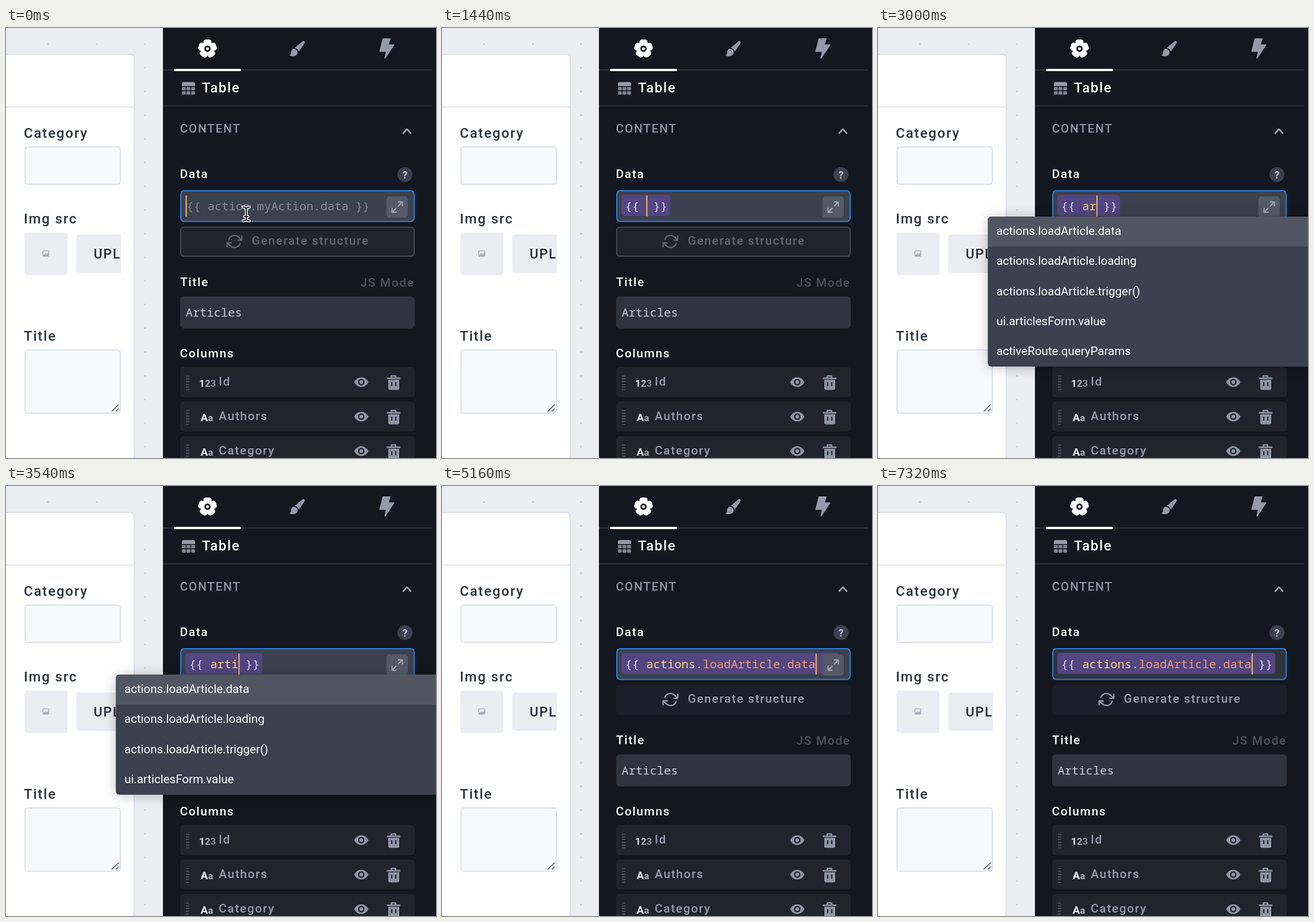
Recreate the animation shown at these times as an HTML page. Size 748 by 748 pixels, loop 7.35 s.

```html
<!DOCTYPE html>
<html lang="en">
<head>
<meta charset="utf-8">
<title>Table data binding</title>
<style>
  html, body { margin: 0; width: 100%; height: 100%; overflow: hidden; background: #ecedf2; }
  #stage { position: absolute; left: 0; top: 0; width: 748px; height: 748px; overflow: hidden; }
  svg { position: absolute; left: 0; top: 0; display: block; }
  text { white-space: pre; }
  .ui { font: 500 21px Roboto, "Open Sans", sans-serif; letter-spacing: .076em; }
  .big { font-size: 24px; }
  .mono { font: 400 20.45px "Roboto Mono", "Noto Sans Mono", "DejaVu Sans Mono", monospace; }
  .field { fill: #f8f9fd; stroke: #dde0ec; stroke-width: 2; }
  .line { fill: none; stroke-linecap: round; stroke-linejoin: round; }
  #menu {
    position: absolute; left: 191px; top: 328px; width: 570px; overflow: hidden;
    border-radius: 6px; background: #3c404f; color: #fff;
    box-shadow: 0 2px 22px rgba(0, 0, 0, .24);
    font: 400 20.5px/50px Roboto, "Open Sans", sans-serif;
  }
  #menu div { height: 52.3px; padding-left: 15px; white-space: nowrap; }
  #menu div:first-child { background: #525663; }
  #bar { position: absolute; left: 742px; top: 328px; width: 6px; height: 420px; background: #14171f; }
  #bar::before { content: ""; display: block; height: 146px; background: #3c404f; border-radius: 0 0 3px 3px; }
</style>
</head>
<body>
<div id="stage">
<svg width="748" height="748" viewBox="0 0 748 748">
  <g id="dots" fill="#c3c6d1"></g>

  <path d="M-10 46H217Q223 46 223 52V760H-10Z" fill="#fff" stroke="#dcdfea" stroke-width="2"/>
  <path d="M0 137.5H222" stroke="#e6e8ef" stroke-width="2"/>
  <g class="ui big" fill="#2b2f3b">
    <text x="31" y="191">Category</text>
    <text x="31" y="340">Img src</text>
    <text x="31" y="544">Title</text>
  </g>
  <rect class="field" x="33" y="207" width="166" height="65" rx="5"/>
  <rect class="field" x="33" y="560" width="166" height="110" rx="5"/>
  <path d="M184 667L196 655M191 667L196 662" stroke="#50545f" stroke-width="1.7"/>
  <rect x="32" y="356" width="75" height="74" rx="5" fill="#ecedf2"/>
  <rect x="64" y="387.500" width="10.500" height="9.500" rx="2" fill="none" stroke="#a9adba" stroke-width="1.500"/>
  <path d="M64.500 395L68 392L70 393.500L74 391V397H65Z" fill="#a9adba"/>
  <path d="M200 359H127Q122 359 122 364V421Q122 426 127 426H200Z" fill="#ecedf2"/>
  <text class="ui" x="152.500" y="401" fill="#262b38" style="font-size:23px">UPL</text>
  <rect x="200" y="359" width="22" height="67" fill="#fff"/>

  <rect x="273" width="475" height="748" fill="#14171f"/>
  <path d="M273 73H741M273 135.500H741" stroke="#30343e" stroke-width="2"/>
  <rect x="292" y="71" width="117" height="4" rx="1.500" fill="#fff"/>

  <g id="gear" fill="#fff"></g>
  <g fill="#959aaa">
    <path d="M516 23Q520 21 519.500 26L509.500 41Q508 36 502.500 34.500Z"/>
    <path d="M500.500 36Q507 37 507.500 43Q506 49 499 49Q494 49 493 47Q496.500 46 496 41.500Q496.500 36.500 500.500 36Z"/>
    <path d="M656 19H668L664.500 29.500H674.500L659.500 52L662 40.500H650.500Z" stroke="#959aaa" stroke-width="2" stroke-linejoin="round"/>
  </g>
  <g id="grid" fill="#7d8291">
    <path d="M306 101V97Q306 94 309 94H326Q329 94 329 97V101Z" fill="#959aa8"/>
  </g>
  <g class="ui">
    <text class="big" x="341" y="112" fill="#fff">Table</text>
    <text x="302.500" y="181.500" fill="#8f94a3">CONTENT</text>
    <g fill="#fff">
      <text x="302.500" y="261">Data</text>
      <text x="303" y="449">Title</text>
      <text x="302.500" y="573">Columns</text>
    </g>
    <text x="616.500" y="450" fill="#4d515c">JS Mode</text>
  </g>
  <path class="line" d="M691 183L697.500 176L704 183" stroke="#9a9fae" stroke-width="2.800"/>
  <circle cx="694" cy="255" r="13" fill="#3e4150"/>
  <text x="694" y="261.500" text-anchor="middle" fill="#c3c8d6" style="font:700 18px Roboto,sans-serif">?</text>

  <rect id="input" x="304" y="283" width="406" height="53.500" rx="6" stroke="#2f80d6" stroke-width="2"/>
  <text id="hint" class="mono" x="314" y="317" fill="#858a97">{{ action.myAction.data }}</text>
  <rect id="pill" x="312" y="290" height="37" rx="5" fill="#534681"/>
  <text class="mono" x="318.500" y="317" fill="#dcdde8"><tspan id="open"></tspan><tspan id="head" fill="#f9d283"></tspan><tspan id="tail" fill="#f09b73"></tspan><tspan id="close"></tspan></text>
  <rect id="caret" y="291.500" width="2" height="36.500" fill="#f4bd62"/>
  <g id="expand">
    <rect x="662" y="293" width="37" height="37" rx="5" fill="#555a68"/>
    <path class="line" d="M682.500 302.500H689.500V309.500M689 303L682.500 309.500M678.500 320.500H671.500V313.500M672 320L678.500 313.500" stroke="#a7acba" stroke-width="1.900"/>
  </g>

  <rect id="button" x="304" y="346.500" width="406" height="50.500" rx="5" stroke-width="2"/>
  <g id="label">
    <path class="line" transform="translate(383.500 357.500) scale(1.160)" stroke-width="2" d="M23 4v6h-6M1 20v-6h6M3.510 9a9 9 0 0 1 14.850-3.360L23 10M1 14l4.640 4.360A9 9 0 0 0 20.490 15"/>
    <text class="ui" x="427.500" y="377" stroke="none">Generate structure</text>
  </g>

  <rect x="303" y="467" width="408" height="55.500" rx="6" fill="#30343f"/>
  <text class="mono" x="312.500" y="502" fill="#c8cbd2">Articles</text>
  <g id="rows"></g>

  <circle id="ring" fill="#fff" fill-opacity=".03" stroke="#d8dae0" stroke-width="3"/>
  <g id="mouse">
    <g id="beam" class="line"></g>
    <path id="arrow" d="M0 0V23L5.500 18L9.500 27L13.500 25L9.500 16.500H17Z" fill="#000" stroke="#fff" stroke-width="1.800" stroke-linejoin="round"/>
  </g>
</svg>
<div id="menu"></div>
<div id="bar"></div>
</div>

<script>
const LOOP = 7350, STEP = 30, CHAR = 12.27;
const $ = id => document.getElementById(id);
const add = (id, markup) => $(id).insertAdjacentHTML("beforeend", markup);
const show = (id, on) => { $(id).style.display = on ? "" : "none"; };
const set = (id, attrs) => { for (const k in attrs) $(id).setAttribute(k, attrs[k]); };

// Static repeats
const dot = (x, y) => add("dots", `<circle cx="${x}" cy="${y}" r="1.6"/>`);
dot(73, 28);
dot(158, 28);
for (let i = 0; i < 18; i++) dot(242, 28 + i * 41.2);

for (let i = 0; i < 5; i++) {
  add("gear", `<rect x="343.5" y="20" width="14" height="16" rx="4.500" transform="rotate(${i * 72} 350.5 36)"/>`);
}
add("gear", `<circle cx="350.5" cy="36" r="11.500"/><circle cx="350.5" cy="36" r="4" fill="none" stroke="#14171f" stroke-width="3"/>`);

for (let i = 0; i < 6; i++) {
  add("grid", `<rect x="${306 + i % 3 * 8}" y="${i < 3 ? 102.5 : 110}" width="6.800" height="6" rx="1"/>`);
}

const tag = (a, b, c = "") => `<tspan fill="#eceef3">${a}</tspan><tspan fill="#a9adb8" font-size="17">${b}</tspan><tspan fill="#858a97" font-size="17">${c}</tspan>`;
const row = (name, kind, y) => {
  let grip = "";
  for (let i = 0; i < 6; i++) grip += `M313 ${15.5 + i * 4.8}h6`;
  add("rows", `<g transform="translate(0 ${y})">
    <rect x="303" width="408" height="52" rx="5" fill="#21242d"/>
    <path d="${grip}" stroke="#535763" stroke-width="1.700"/>
    <text x="${kind === "n" ? 336 : 338.5}" y="34" style="font:700 ${kind === "n" ? 17 : 19}px Roboto,sans-serif">${kind === "n" ? tag(1, 2, 3) : tag("A", "a")}</text>
    <text class="ui" x="370" y="32" fill="#969bab">${name}</text>
    <g fill="#9095a5">
      <path d="M605.500 26Q610 17.500 618 17.500T630.500 26Q626 34.500 618 34.500T605.500 26Z"/>
      <circle cx="618" cy="26" r="4.500" stroke="#21242d" stroke-width="2.500"/>
      <path d="M669 18V15.500Q669 14 670.500 14H677.500Q679 14 679 15.500V18H686V20.800H662.500V18ZM671.500 18H676.500V16.500H671.500Z" fill-rule="evenodd"/>
      <path d="M665 22H684V36.500Q684 39.500 681 39.500H668Q665 39.500 665 36.500Z"/>
      <path d="M671 26V33M678 26V33" stroke="#21242d" stroke-width="2.200"/>
    </g></g>`);
};
row("Id", "n", 590);
row("Authors", "t", 650);
row("Category", "t", 710);

const beam = "M-5.500 -12Q-1 -12 0 -9Q1 -12 5.500 -12M0 -9V9M-5.500 12Q-1 12 0 9Q1 12 5.500 12M-3 4.500H3";
add("beam", `<path d="${beam}" stroke="#fff" stroke-width="4.800"/><path d="${beam}" stroke="#15171d" stroke-width="1.900"/>`);

// Timeline: [time, value]
const typed = [[0, null], [1440, ""], [2640, "a"], [2880, "ar"], [3150, "art"], [3420, "arti"], [3690, "artic"], [4800, "actions.loadArticle.data"]];
const caretOn = [[0, true], [2040, false], [2640, true], [4200, false], [5160, true]];
const article = ["data", "loading", "trigger()"].map(s => "actions.loadArticle." + s);
const users = ["data", "loading", "trigger()"].map(s => "actions.loadTestUsers." + s);
const form = "ui.articlesForm.value";
const lists = [
  [0, []],
  [1500, [...article, ...users, form, "ui.table.deletedRow.data", "ui.table.selectedRow.data"]],
  [2880, [...article, form, "activeRoute.queryParams"]],
  [3420, [...article, form]],
  [4800, []]
];
const at = (table, t) => table.reduce((v, [time, next]) => t >= time ? next : v, table[0][1]);

const clamp = v => Math.max(0, Math.min(1, v));
const ease = p => p * p * (3 - 2 * p);
const path = [[0, 418, 323.5], [420, 418, 323.5], [780, 390.5, 320.5], [5940, 390.5, 320.5], [6210, 388, 319.5], [6360, 388, 319.5], [7080, 352, -32], [LOOP, 352, -32]];
const mouseAt = t => {
  const i = path.findIndex(p => p[0] > t);
  const [t0, x0, y0] = path[i - 1], [t1, x1, y1] = path[i];
  const p = ease((t - t0) / (t1 - t0));
  return [x0 + (x1 - x0) * p, y0 + (y1 - y0) * p];
};

let shownList;
const drawMenu = list => {
  if (list === shownList) return;
  shownList = list;
  $("menu").innerHTML = list.map(s => `<div>${s}</div>`).join("");
  show("menu", list.length);
  show("bar", list.length > 5);
};

function draw(t) {
  const code = at(typed, t), active = code !== null, ready = t >= 4800;
  const [x, y] = mouseAt(t), hover = y > 282;

  set("input", { fill: hover ? "#3c4150" : "#30343f" });
  show("hint", !active);
  show("pill", active);
  show("expand", hover);
  const dotAt = active ? code.indexOf(".") + 1 : 0;
  $("open").textContent = active ? "{{ " : "";
  $("head").textContent = active ? (dotAt ? code.slice(0, dotAt) : code) : "";
  $("tail").textContent = dotAt ? code.slice(dotAt) : "";
  $("close").textContent = active ? " }}" : "";
  set("pill", { width: active ? (code.length + 6) * CHAR + 11 : 0 });
  set("caret", { x: active ? 318.5 + (code.length + 3) * CHAR : 312.5 });
  show("caret", at(caretOn, t));

  set("button", { fill: ready ? "#1c1f29" : "#21242d", stroke: ready ? "#1c1f29" : "#444853" });
  const ink = ready ? "#969bab" : "#636772";
  set("label", { fill: ink, stroke: ink });
  drawMenu(at(lists, t));

  const p = clamp((t - 780) / 360);
  show("ring", p > 0 && p < 1);
  set("ring", { cx: 390.5, cy: 320, r: 72 * (1 - (1 - p) ** 2), opacity: .7 * clamp((1 - p) * 2) });

  set("mouse", {
    transform: `translate(${x} ${y})`,
    opacity: t < 5940 ? clamp((1260 - t) / 120) : clamp((t - 5910) / 90)
  });
  show("beam", hover);
  show("arrow", !hover);
}

const start = performance.now();
function tick() {
  const t = (performance.now() - start) % LOOP;
  draw(Math.floor(t / STEP) * STEP);
  requestAnimationFrame(tick);
}
tick();
</script>
</body>
</html>
```
